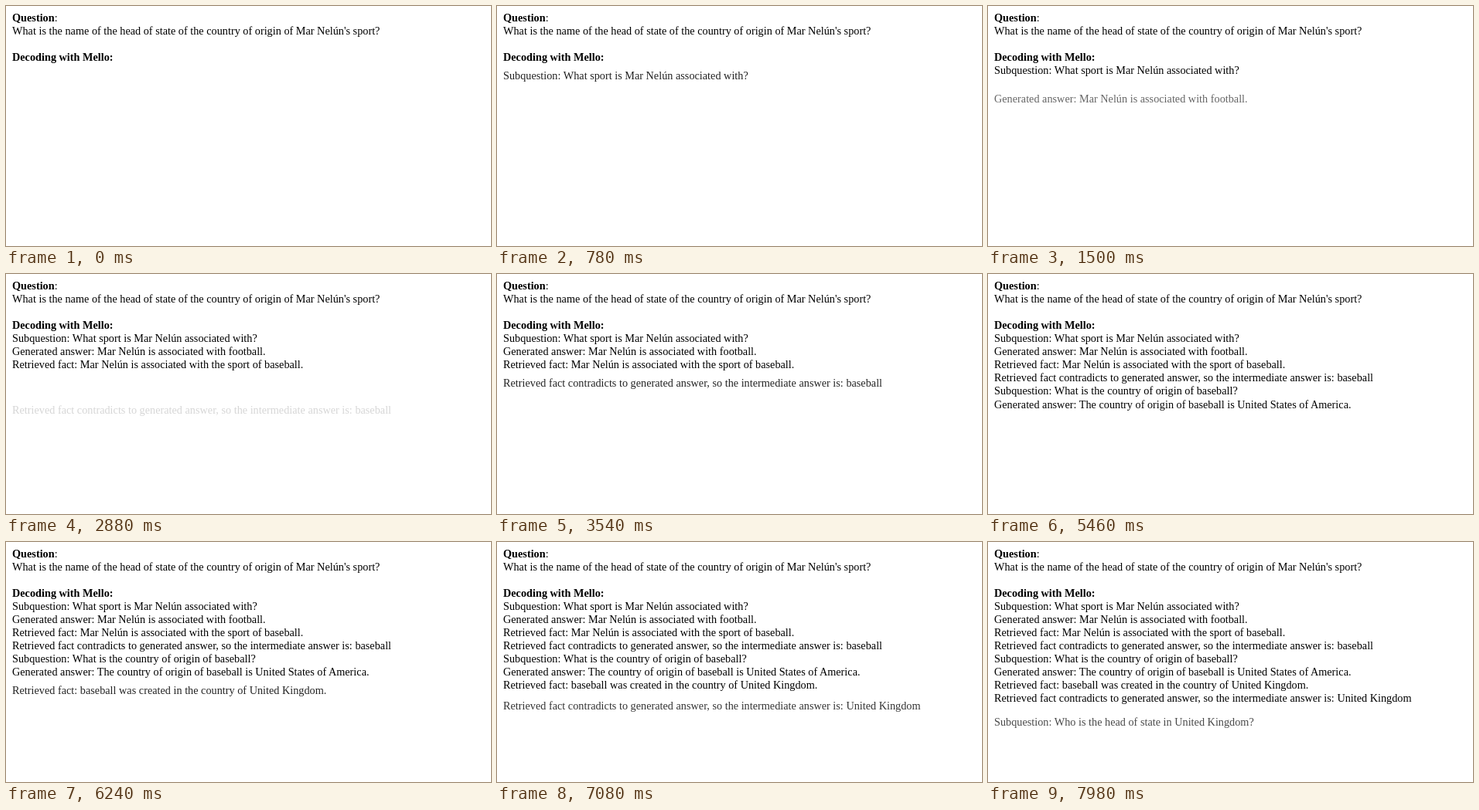
An HTML page for the animation above (8000 ms loop, 627 px wide and 311 px high).

```html
<!DOCTYPE html>
<html lang="en">
<head>
<meta charset="utf-8">
<title>Step-by-step decoding</title>
<style>
  html, body { margin: 0; width: 100%; height: 100%; overflow: hidden; background: #fff; }
  svg { display: block; width: 627px; height: 311px; }
  text { font: 14.25px "Liberation Serif", "Times New Roman", serif; }
  .bold { font-weight: bold; }
</style>
</head>
<body>
<svg id="stage" viewBox="0 0 627 311">
  <text x="8" y="20"><tspan class="bold">Question</tspan>:</text>
  <text x="8" y="37">What is the name of the head of state of the country of origin of Mar Nelún's sport?</text>
  <text x="8" y="71" class="bold">Decoding with Mello:</text>
</svg>
<script>
const LOOP = 8000, STEP = 60;
const FIRST_BASELINE = 88, LINE_HEIGHT = 17;
const RISE = 50, SPEED = 0.053; // px, px per ms
const FIRST_VISIBLE = 46.5;     // lines lower than this stay hidden

const lines = [
  [-40, "Subquestion: What sport is Mar Nelún associated with?"],
  [930, "Generated answer: Mar Nelún is associated with football."],
  [1830, "Retrieved fact: Mar Nelún is associated with the sport of baseball."],
  [2730, "Retrieved fact contradicts to generated answer, so the intermediate answer is: baseball"],
  [3630, "Subquestion: What is the country of origin of baseball?"],
  [4530, "Generated answer: The country of origin of baseball is United States of America."],
  [5430, "Retrieved fact: baseball was created in the country of United Kingdom."],
  [6330, "Retrieved fact contradicts to generated answer, so the intermediate answer is: United Kingdom"],
  [7305, "Subquestion: Who is the head of state in United Kingdom?"],
].map(([start, content], row) => {
  const node = document.createElementNS("http://www.w3.org/2000/svg", "text");
  node.textContent = content;
  node.setAttribute("x", 8);
  document.getElementById("stage").append(node);
  return { start, node, baseline: FIRST_BASELINE + row * LINE_HEIGHT };
});

function draw(time) {
  const t = Math.floor((time % LOOP) / STEP) * STEP;
  for (const { start, node, baseline } of lines) {
    const offset = Math.max(0, RISE - SPEED * (t - start));
    node.setAttribute("y", baseline + Math.round(offset));
    node.setAttribute("opacity", offset < FIRST_VISIBLE ? 1 - offset / RISE : 0);
  }
}

const origin = performance.now();
function frame() {
  draw(performance.now() - origin);
  requestAnimationFrame(frame);
}
frame();
</script>
</body>
</html>
```
